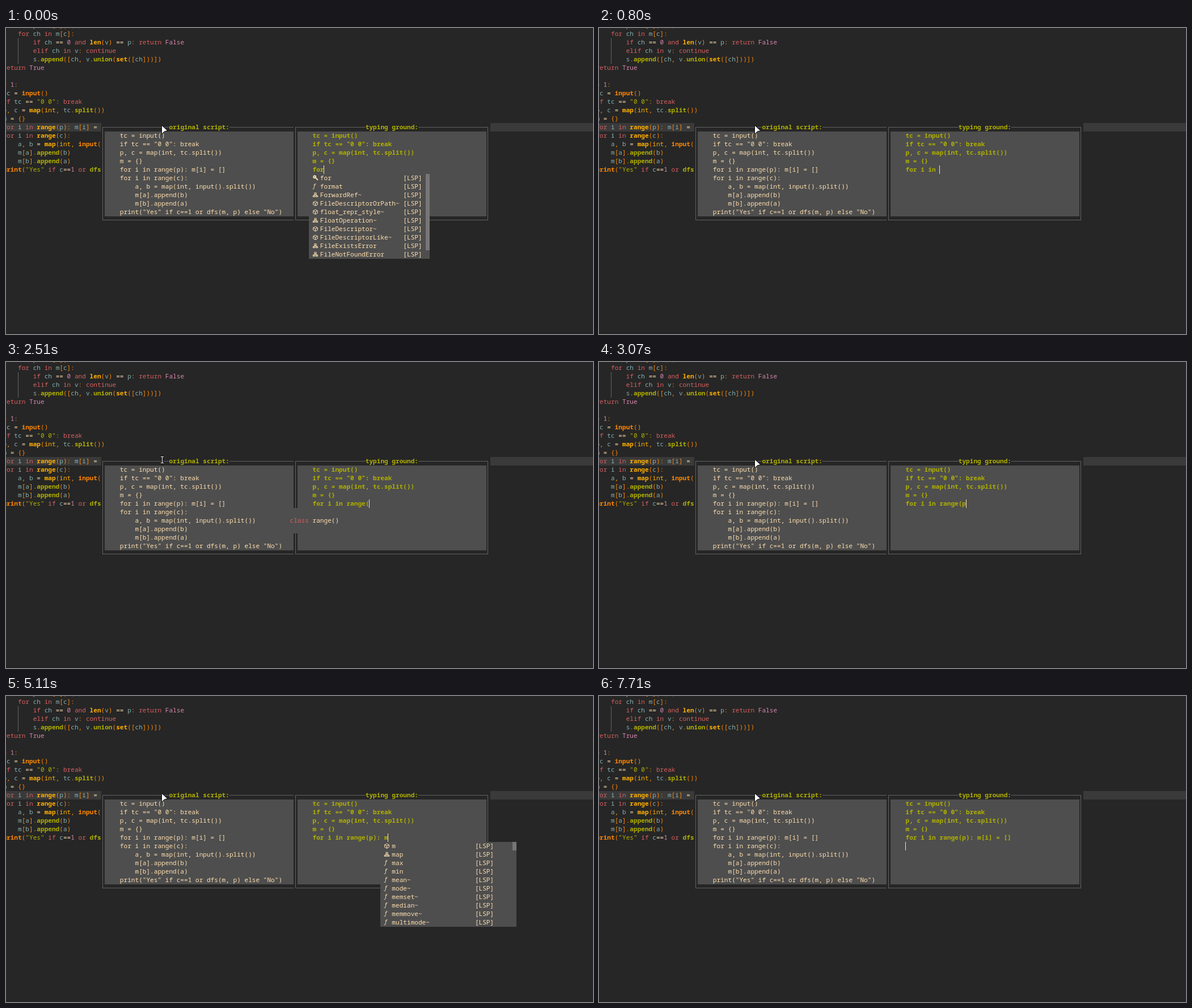
An HTML page with a canvas that plays this animation: 1035 px wide and 541 px high, repeating every 8 s.

```html
<!DOCTYPE html>
<html lang="en">
<head>
<meta charset="utf-8">
<title>Typing practice</title>
<style>
html, body { margin: 0; width: 1035px; height: 541px; overflow: hidden; background: #262626; }
canvas { display: block; }
</style>
</head>
<body>
<canvas id="stage" width="1035" height="541"></canvas>
<script>
const ctx = document.getElementById('stage').getContext('2d');
const LOOP = 8000, CELL = 6.66, LINE = 15;
const FONT = '11.1px "Noto Sans Mono", "DejaVu Sans Mono", monospace';
const C = {
  bg: '#262626', row: '#3a3a3a', float: '#4e4e4e', guide: '#626262', thumb: '#767676',
  text: '#ffdfaf', red: '#d75f5f', green: '#afaf00', gold: '#ffaf00', blue: '#87afaf',
  purple: '#d787af', orange: '#ff8700'
};

// Terminal grid: column and row to pixels
const X = col => 1.05 + col * CELL;
const Y = row => 3 + row * LINE;
const GROUND = 81, TYPED = 16;

function box(col, row, cols, rows, color) {
  const x = Math.round(X(col));
  ctx.fillStyle = color;
  ctx.fillRect(x, Y(row), Math.round(X(col + cols)) - x, rows * LINE);
}

function text(str, col, row, color = C.text, bold = false) {
  ctx.font = (bold ? 'bold ' : '') + FONT;
  ctx.fillStyle = color;
  ctx.fillText(str, X(col), Y(row) + 11);
}

// ---------- code behind the windows ----------
const CODE = [
  [7, -1, 'p = s[0], (v)'],
  [3, 0, 'for ch in m[c]:'],
  [7, 1, 'if ch == 0 and len(v) == p: return False'],
  [7, 2, 'elif ch in v: continue'],
  [7, 3, 's.append([ch, v.union(set([ch]))])'],
  [-1, 4, 'return True'],
  [-5, 6, 'while 1:'],
  [-1, 7, 'tc = input()'],
  [-1, 8, 'if tc == "0 0": break'],
  [-1, 9, 'p, c = map(int, tc.split())'],
  [-1, 10, 'm = {}'],
  [-1, 11, 'for i in range(p): m[i] = []'],
  [-1, 12, 'for i in range(c):'],
  [3, 13, 'a, b = map(int, input().split())'],
  [3, 14, 'm[a].append(b)'],
  [3, 15, 'm[b].append(a)'],
  [-1, 16, 'print("Yes" if c==1 or dfs(m, p) else "No")']
];

const RULES = [
  [/^"/, C.green],
  [/^(for|in|if|elif|else|and|or|return|continue|break|while)$/, C.red],
  [/^(True|False|\d+)$/, C.purple],
  [/^(input|print)$/, C.orange, true],
  [/^(map|range|len|set)$/, C.gold, true],
  [/^int$/, C.gold],
  [/^(append|union|split|dfs)$/, C.green, true],
  [/^\w/, C.blue],
  [/^=/, C.text],
  [/./, C.orange]
];

function code(col, row, str) {
  for (const m of str.matchAll(/"[^"]*"|\w+|=+|\S/g)) {
    const [, color, bold] = RULES.find(r => r[0].test(m[0]));
    text(m[0], col + m.index, row, color, bold);
  }
}

// ---------- completion menus ----------
const menu = (word, cols, tagCol, thumb, items) => ({ word, cols, tagCol, thumb, items: items.split(' ') });

// Item prefix: k keyword, f function, c class, v variable, b buffer word
const MENUS = {
  for: menu(0, 32, 25, 9, 'k:for f:format c:ForwardRef~ v:FileDescriptorOrPath~ v:float_repr_style~ c:FloatOperation~ v:FileDescriptor~ v:FileDescriptorLike~ c:FileExistsError c:FileNotFoundError'),
  in: menu(6, 18, 9, 0, 'k:in b:int b:input'),
  i: menu(6, 37, 26, 1, 'k:in k:if k:is k:import c:int f:input f:id f:iter f:isinstance f:issubclass'),
  int: menu(6, 37, 26, 3, 'k:in c:int f:input c:IndexError c:IndentationError c:InterruptedError c:IntEnum~ c:IntFlag~ f:insort~ f:indent~'),
  r: menu(9, 29, 22, 5, 'c:range k:raise c:Rational~ c:RawIOBase~ f:reveal_type~ f:reveal_type~ f:resolve_bases~ f:runtime_checkable~ f:runtime_checkable~ v:ReadOnlyBuffer~'),
  p: menu(15, 40, 29, 1, 'v:p k:pass f:pow f:print c:property c:partial~ c:PurePath~ c:PermissionError c:ProcessLookupError c:PendingDeprecationWarning'),
  m: menu(19, 36, 25, 1, 'v:m c:map f:max f:min f:mean~ f:mode~ f:memset~ f:median~ f:memmove~ f:multimode~'),
  key: menu(21, 36, 25, 1, 'v:c v:i v:m v:p v:tc f:dfs f:abs f:all f:any f:ascii')
};
MENUS.i2 = { ...MENUS.i, word: 21 };

function path(points, close) {
  ctx.beginPath();
  points.forEach(([x, y]) => ctx.lineTo(x, y));
  if (close) ctx.closePath();
}

const ICONS = {
  k() {
    ctx.lineWidth = 2;
    ctx.beginPath(); ctx.arc(3.2, 5.2, 1.9, 0, 7); ctx.stroke();
    path([[4.8, 6.7], [9, 10.9]]); ctx.stroke();
  },
  f() {
    ctx.font = 'italic 10px "DejaVu Sans", sans-serif';
    ctx.fillText('ƒ', 1, 10);
  },
  c() {
    ctx.strokeRect(3, 3.5, 3, 2);
    ctx.strokeRect(.5, 8.5, 3, 2);
    ctx.strokeRect(5.5, 8.5, 3, 2);
    path([[2, 8], [2, 7], [7, 7], [7, 8]]); ctx.stroke();
    path([[4.5, 6], [4.5, 7]]); ctx.stroke();
  },
  v() {
    path([[4.5, 3.2], [8.3, 5.2], [8.3, 9.3], [4.5, 11.3], [.7, 9.3], [.7, 5.2]], true); ctx.stroke();
    path([[.7, 5.2], [4.5, 7.2], [8.3, 5.2]]); ctx.stroke();
    path([[4.5, 7.2], [4.5, 11.3]]); ctx.stroke();
  },
  b() {
    ctx.lineWidth = 1.4;
    path([[3, 4], [9, 4]]); ctx.stroke();
    path([[6.2, 4], [6.2, 11]]); ctx.stroke();
    path([[0, 7], [4, 7]]); ctx.stroke();
    path([[2, 7], [2, 11]]); ctx.stroke();
  }
};

function icon(kind, col, row, color) {
  ctx.save();
  ctx.translate(Math.round(X(col)), Y(row));
  ctx.fillStyle = ctx.strokeStyle = color;
  ctx.lineWidth = 1;
  ICONS[kind]();
  ctx.restore();
}

function drawMenu({ word, cols, tagCol, thumb, items }, picked) {
  const left = GROUND + word - 1, top = TYPED + 1;
  box(left, top, cols, items.length, C.float);
  if (picked) box(left, top, cols - 1, 1, C.blue);
  box(left + cols - 1, top, 1, thumb, C.thumb);
  items.forEach((item, i) => {
    const [kind, label] = item.split(':');
    const on = picked && i === 0, color = on ? C.float : C.text;
    icon(kind, left + 1, top + i, color);
    text(label, left + 3, top + i, color, on);
    text(kind === 'b' ? '[Buffer]' : '[LSP]', left + tagCol, top + i, color, on);
  });
}

function drawDoc() {
  box(74, 17, 15, 3, C.float);
  text('class', 75, 18, C.red);
  text('range()', 81, 18);
}

// ---------- the two windows ----------
const SCRIPT = CODE.slice(7).map(([col, , str]) => (col > 0 ? '    ' : '') + str);

function frame(left, right, title, titleCol) {
  const x0 = Math.floor(X(left) + 3), x1 = Math.floor(X(right));
  ctx.fillStyle = C.guide;
  ctx.fillRect(x0, 175, 1, 165);
  for (const y of [175, 339]) ctx.fillRect(x0, y, x1 - x0, 1);
  box(titleCol, 11, title.length, 1, C.bg);
  text(title, titleCol, 11, C.green, true);
}

function drawScene() {
  ctx.fillStyle = C.bg;
  ctx.fillRect(0, 0, 1035, 541);
  ctx.fillStyle = '#232323';
  ctx.fillRect(0, 538, 1035, 3);
  box(-1, 11, 157, 1, C.row);
  ctx.fillStyle = C.guide;
  ctx.fillRect(21, 18, 1, 45);
  CODE.forEach(line => code(...line));

  box(25, 11, 103, 12, C.bg);
  frame(25, 76, 'original script:', 43);
  frame(76, 127.5, 'typing ground:', 95);
  ctx.fillStyle = C.guide;
  ctx.fillRect(849, 175, 1, 165);
  box(26, 12, 50, 10, C.float);
  box(77, 12, 50, 10, C.float);
  SCRIPT.forEach((str, i) => text(str, 30, 12 + i));
  SCRIPT.slice(0, 4).forEach((str, i) => text(str, GROUND, 12 + i, C.green, true));
}

// ---------- timeline: time, characters typed, menu, bracket pair, flags ----------
const FULL = 'for i in range(p): m[i] = []';
const STEPS = [
  [0, 3, 'for'],
  [80, 4],
  [240, 5],
  [320, 6],
  [400, 7],
  [470, 7, 'i'],
  [550, 8, 'in'],
  [640, 8, 'int'],
  [800, 9],
  [960, 10, 'r'],
  [1440, 14, 'r', null, 'pick'],
  [1530, 14, 'r', null, 'pick doc'],
  [2510, 15, null, null, 'doc'],
  [2590, 15],
  [3070, 16],
  [3150, 16, 'p'],
  [3480, 17, null, [14, 16]],
  [4540, 18],
  [4710, 19],
  [5030, 20],
  [5110, 20, 'm'],
  [5510, 21],
  [5590, 21, 'key'],
  [5750, 22],
  [5830, 22, 'i2'],
  [5990, 23, null, [20, 22]],
  [6560, 24],
  [6730, 25],
  [6900, 26],
  [7060, 27],
  [7120, 28, null, [26, 27]],
  [7380, 28, null, null, 'indent'],
  [7710, 28, null, null, 'home']
];
const BEAM = [[1940, 2840], [3230, 3890], [4390, 4790]];

function drawPointer(t) {
  ctx.save();
  ctx.translate(275, 173);
  ctx.lineJoin = 'round';
  ctx.strokeStyle = '#111';
  if (BEAM.some(([a, b]) => t >= a && t < b)) {
    for (const [color, width] of [['#111', 3], ['#fff', 1]]) {
      ctx.strokeStyle = color;
      ctx.lineWidth = width;
      path([[.5, -5.5], [.5, 5.5]]); ctx.stroke();
      for (const y of [-5.5, 5.5]) { path([[-2, y], [3, y]]); ctx.stroke(); }
    }
  } else {
    path([[0, 0], [9, 8.3], [4.6, 9.2], [0, 13.5]], true);
    ctx.lineWidth = 2;
    ctx.stroke();
    ctx.fillStyle = '#fff';
    ctx.fill();
  }
  ctx.restore();
}

function draw(t) {
  const [, count, name, pair, flags = ''] = STEPS.findLast(s => s[0] <= t);
  drawScene();
  if (pair) pair.forEach(col => box(GROUND + col, TYPED, 1, 1, C.guide));
  text(FULL.slice(0, count), GROUND, TYPED, C.green, true);
  if (name) drawMenu(MENUS[name], flags.includes('pick'));
  if (flags.includes('doc')) drawDoc();

  const down = /indent|home/.test(flags);
  const col = down ? (flags === 'home' ? 0 : 4) : count;
  ctx.fillStyle = C.text;
  ctx.fillRect(Math.floor(X(GROUND + col)), Y(TYPED + down), 1, LINE);
  drawPointer(t);
}

const start = performance.now();
function tick(now) {
  draw(Math.max(0, now - start) % LOOP);
  requestAnimationFrame(tick);
}
draw(0);
requestAnimationFrame(tick);
</script>
</body>
</html>
```
